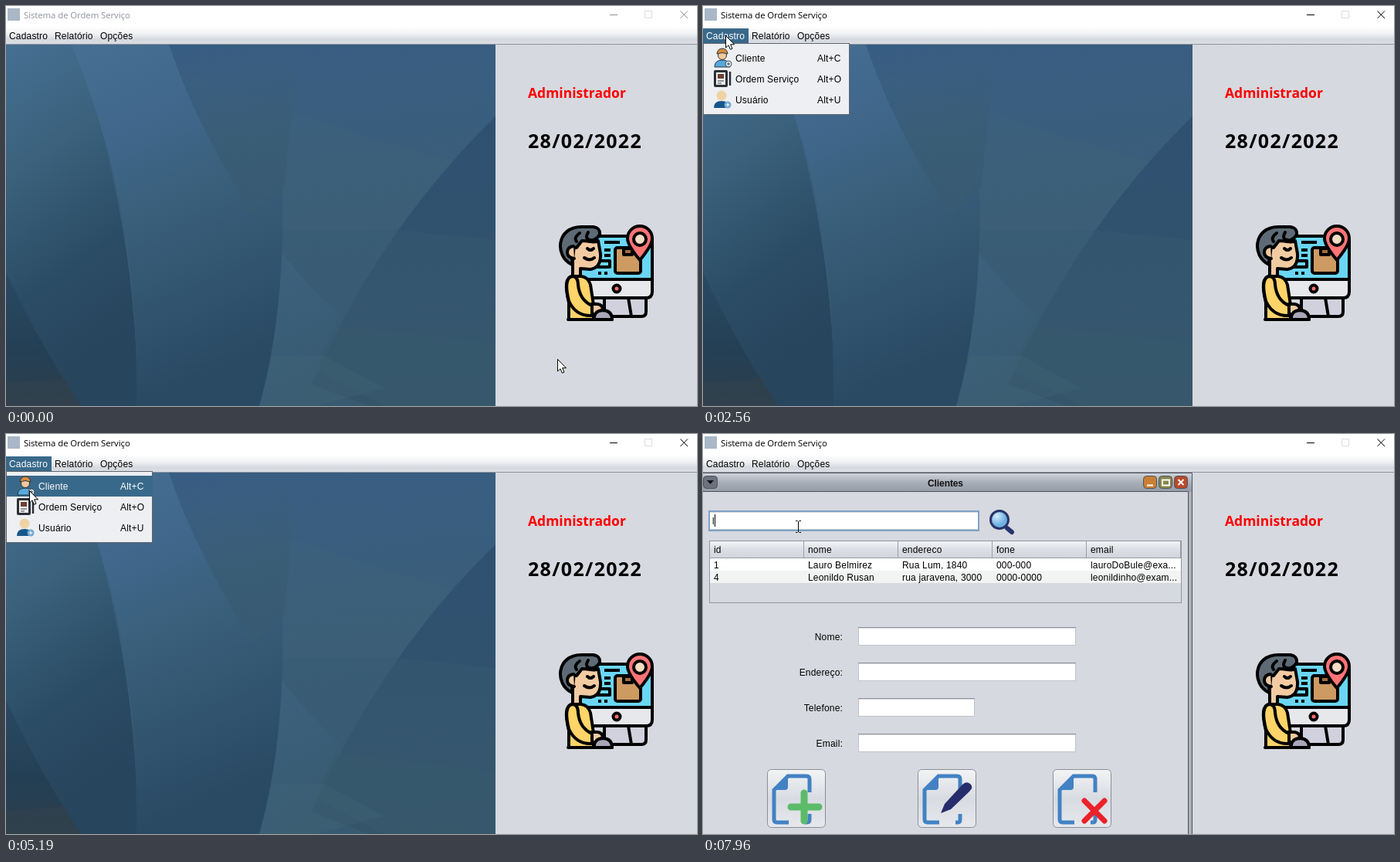
Animation of 895 by 518 pixels, one loop 8000 ms. Source, as an HTML page:

```html
<!DOCTYPE html>
<html lang="pt">
<head>
<meta charset="utf-8">
<style>
html, body { margin: 0; width: 100%; height: 100%; overflow: hidden; }
svg { display: block; width: 895px; height: 518px; }
text { font: 12px "Liberation Sans", Arial, sans-serif; letter-spacing: .18px; white-space: pre; }
.title { font: 11.4px "Open Sans", sans-serif; letter-spacing: -.08px; }
.big { font: bold 17.5px "Noto Sans", sans-serif; letter-spacing: 0; }
.date { font: bold 25px "Noto Sans", sans-serif; letter-spacing: 1.3px; }
.bold { font-weight: bold; letter-spacing: -.1px; }
.end { text-anchor: end; }
</style>
</head>
<body>
<svg viewBox="0 0 895 518">
<defs>
  <linearGradient id="bar" x2="0" y2="1"><stop stop-color="#fff"/><stop offset=".4" stop-color="#f1f2f4"/><stop offset=".75" stop-color="#d5d9df"/><stop offset="1" stop-color="#dcdfe4"/></linearGradient>
  <linearGradient id="head" x2="0" y2="1"><stop stop-color="#f4f5f7"/><stop offset=".5" stop-color="#dcdfe5"/><stop offset="1" stop-color="#d0d4da"/></linearGradient>
  <linearGradient id="btn" x2="0" y2="1"><stop stop-color="#f3f4f6"/><stop offset=".5" stop-color="#d8dbe1"/><stop offset="1" stop-color="#e6e8ec"/></linearGradient>
  <linearGradient id="liveBar" x2="0" y2="1"><stop stop-color="#d2d6dc"/><stop offset=".5" stop-color="#a9afb9"/><stop offset="1" stop-color="#949ba7"/></linearGradient>
  <linearGradient id="idleBar" x2="0" y2="1"><stop stop-color="#aeb4be"/><stop offset="1" stop-color="#c6cad1"/></linearGradient>
  <linearGradient id="sky" x2=".15" y2="1"><stop stop-color="#385d83"/><stop offset=".25" stop-color="#395e7f"/><stop offset=".6" stop-color="#3a5d76"/><stop offset="1" stop-color="#385a71"/></linearGradient>
  <linearGradient id="left" x2=".25" y2="1"><stop stop-color="#466f92"/><stop offset=".35" stop-color="#3b617c"/><stop offset=".7" stop-color="#2b4c65"/><stop offset="1" stop-color="#27455c"/></linearGradient>
  <linearGradient id="ribbon" x2=".25" y2="1"><stop stop-color="#476f93"/><stop offset=".3" stop-color="#40678a"/><stop offset=".55" stop-color="#395e79"/><stop offset="1" stop-color="#2a4a64"/></linearGradient>
  <linearGradient id="right" x2="0" y2="1"><stop stop-color="#2f5070"/><stop offset=".6" stop-color="#32536d"/><stop offset="1" stop-color="#355569"/></linearGradient>
  <linearGradient id="corner" x2="0" y2="1"><stop stop-color="#2a4a62"/><stop offset=".6" stop-color="#243f54"/><stop offset="1" stop-color="#2d3f4d"/></linearGradient>
  <linearGradient id="fade" x2=".4" y2="1"><stop stop-color="#3d6380"/><stop offset="1" stop-color="#3d6380" stop-opacity="0"/></linearGradient>
  <radialGradient id="lens" cx=".35" cy=".3"><stop stop-color="#d5ecfb"/><stop offset="1" stop-color="#6fb2e2"/></radialGradient>
</defs>

<!-- window chrome -->
<path fill="#fff" d="M0 0H895V27H0z"/>
<path fill="#a9b7c7" d="M2 3h16v16H2z"/>
<text id="caption" class="title" x="23" y="16">Sistema de Ordem Serviço</text>
<g id="winBtns" fill="none"><path d="M782 11.5h10M873.5 6.5l9.500 9.500m0-9.500l-9.500 9.500"/><path stroke="#ddd" d="M827.500 6.500h9v9h-9z"/></g>
<path fill="url(#bar)" d="M0 27H895V49H0z"/>
<path fill="#9094a0" d="M0 49H895v1H0z"/>
<g id="menuBar"></g>

<!-- desktop -->
<path fill="url(#sky)" d="M0 50H634V518H0z"/>
<path fill="#41657a" opacity=".25" d="M225 85L470 170 634 215V290L360 290Q290 220 225 85z"/>
<path fill="url(#left)" d="M0 50H90Q172 290 170 518H0z"/>
<path fill="url(#corner)" d="M0 345Q45 440 97 518H0z"/>
<path fill="#33414d" opacity=".6" d="M0 488L75 482 97 518H0z"/>
<path fill="url(#fade)" d="M320 270Q380 355 432 400L400 470 490 490 400 518H328Q358 420 359 235z"/>
<path fill="url(#ribbon)" d="M85 50H211C242 140 285 215 320 270L358 222C362 360 346 455 328 518H169C172 330 142 190 85 50z"/>
<path fill="url(#sky)" d="M211 50H380L360 235 320 270C285 215 242 140 211 50z" opacity=".8"/>
<path fill="url(#right)" d="M634 143C535 240 462 345 395 490L470 518H634z"/>
<path fill="#3a5d70" opacity=".3" d="M505 290L634 303V437L428 415z"/>
<path fill="#3a5b6e" opacity=".55" d="M428 414L634 437V518H490L400 470z"/>
<path fill="#416477" opacity=".35" d="M345 453H412L490 495 400 518H328z"/>

<!-- side panel -->
<path fill="#d6d9df" d="M634 50H895V518H634z"/>
<text class="big" x="676" y="119" fill="#f00">Administrador</text>
<text class="date" x="676" y="184">28/02/2022</text>
<g stroke="#000" stroke-width="4" stroke-linejoin="round" stroke-linecap="round">
  <path fill="#d0d1dd" d="M775 378H829V396Q829 402 823 402H775zM806 378L810 402"/>
  <path fill="#6ad6f3" d="M742 298H830Q837 298 837 305V354H742z"/>
  <path fill="#e7e8ec" d="M742 354H837V370Q837 378 829 378H742z"/>
  <circle cx="791" cy="366" r="4.500" fill="#ff7070"/>
  <path fill="none" stroke-linecap="butt" d="M775 306H795M775 316H783M775 323H783M762 330H782V338H764M767 346h4M775 346h4"/>
  <rect x="789" y="313" width="33" height="33" rx="3" fill="#cd9a62"/>
  <path fill="#a06c3c" d="M800 314h11v8h-11z"/>
  <path fill="#ff7476" d="M821 329Q805 310 805 301A16 16 0 0 1 837 301Q837 310 821 329z"/>
  <circle cx="821" cy="302" r="8" fill="#f6dcc3"/>
  <path fill="#f2cba2" d="M737 299Q760 309 767 304L770 321Q771 339 757 341L744 340V354H734V329z"/>
  <path fill="#5e6b76" d="M733 335C710 324 713 286 745 286H760Q770 287 769 296Q764 306 746 304L739 313 734 312z"/>
  <path fill="none" d="M754 293Q749 302 757 303M743 294Q735 300 739 305M753 314q4 4 8 0M749 326q7 5 13 0"/>
  <path fill="#f2cba2" d="M735 311Q727 312 727 319Q727 326 736 327"/>
  <path fill="#ffd469" d="M729 406V384Q721 352 733 350H745Q754 351 757 361L761 387V406z"/>
  <path fill="none" d="M739 352Q736 382 754 388"/>
  <path fill="#f2cba2" d="M758 386H766Q773 387 773 393L764 399H755z"/>
  <path fill="#ffd469" d="M729 382Q722 353 733 350Q741 350 741 361Q743 381 759 388V401Q738 402 729 382z"/>
  <path fill="#aaa6ba" d="M762 406V402Q764 394 774 394Q785 395 785 406z"/>
  <path d="M728 406H785"/>
</g>

<g id="win">
  <path fill="#d6d9df" d="M0 50H634V518H0z"/>
  <g id="idle"></g><g id="live"></g>
  <g id="form"></g>
  <path id="focus" fill="none" stroke="#7fa2c6" stroke-width="2" d="M8 100H357V125H8z"/>
  <text id="typed" x="12" y="117">l</text>
  <path id="caret" stroke="#000" d="M.5 104V120"/>
  <g stroke="#27346b"><path stroke-width="6" stroke-linecap="round" d="M394 122L400 127"/><circle cx="384" cy="111" r="11.500" stroke-width="3" fill="url(#lens)"/></g>
  <g id="empty"></g><g id="filled"></g>
</g>
<g id="popups"></g>
<path id="arrow" fill="#fff" stroke="#000" d="M.5.5V16L4 12.800 6.400 18.300 9 17.200 6.600 11.800H11.500z"/>
<path id="beam" fill="none" stroke="#000" d="M-3-7.500H-.5M1.500-7.500H4M-3 7.500H-.5M1.500 7.500H4M.5-7V7"/>
</svg>

<script>
const $ = id => document.getElementById(id);
const show = (id, on) => $(id).style.display = on ? '' : 'none';
const text = (x, y, s, attrs = '') => `<text x="${x}" y="${y}" ${attrs}>${s}</text>`;
const rect = (x, y, w, h, fill, attrs = '') =>
  `<rect x="${x}" y="${y}" width="${w}" height="${h}" fill="${fill}" ${attrs}/>`;
const path = (d, attrs) => `<path d="${d}" ${attrs}/>`;

// 24 px menu icons
const badge = '<circle cx="20" cy="20" r="4" fill="#dfe8ee" stroke="#41515d"/><path d="M18 20h4M20 18v4" stroke="#41515d"/>';
const board = (ink, paper) => rect(3, 2, 18, 21, ink, 'rx="2"') + rect(6, 5, 12, 15, paper) + rect(9, 0, 6, 5, ink, 'rx="1"');
const icons = {
  client: path('M2 24Q2 15 12 15T22 24z', 'fill="#57a9dc" stroke="#263843"') +
    '<circle cx="12" cy="9" r="5.500" fill="#f3c89b" stroke="#263843"/>' +
    path('M5 7Q6 0 12 0T19 7Q12 4 5 7z', 'fill="#d98a3d" stroke="#263843"') + badge,
  order: rect(1, 1, 18, 22, '#2b2f36', 'rx="2"') + rect(4, 4, 12, 16, '#f1efec') + rect(6, 6, 8, 6, '#6d4133') +
    path('M6 15h8M6 18h5', 'stroke="#33404c"') + path('M22 3V21', 'stroke="#2b2f36" stroke-width="2.500"'),
  user: path('M1 23Q1 14 11 14T21 23z', 'fill="#17568c"') + '<circle cx="11" cy="7" r="6.500" fill="#f0d3a4"/>' +
    '<circle cx="19" cy="19" r="4.500" fill="#6ea7d1"/><path d="M16.500 19h5M19 16.500v5" stroke="#fff"/>',
  sheet: path('M4 1H20V20H4z', 'fill="#dfe6f3"') + path('M1 21H16V23H1z', 'fill="#c9d0e6"') + path('M21.500 1V18', 'stroke="#9aa4c4" stroke-width="2"') +
    '<circle cx="11" cy="8" r="3" fill="#3b8fd6"/>' + path('M7 16Q7 11 11 11T15 16z', 'fill="#3b8fd6"'),
  list: board('#30343a', '#eceef0') + path('M7 8h3M12 8h5M7 12h3M12 12h5M7 16h3M12 16h5', 'stroke="#30343a" stroke-width="2"')
};

const menus = [
  { name: 'Cadastro', x: 0, tx: 4, w: 59, pw: 190, keyX: 148, items: [['Cliente', 'Alt+C', 'client'], ['Ordem Serviço', 'Alt+O', 'order'], ['Usuário', 'Alt+U', 'user']] },
  { name: 'Relatório', x: 59, tx: 63, w: 59, pw: 168, keyX: 174, items: [['Clientes', 'Shift+C', 'sheet'], ['Serviços', 'Shift+S', 'list']] },
  { name: 'Opções', x: 118, tx: 122, w: 51, pw: 117, keyX: 184, items: [['Sair', 'Alt+F4']] }
];
$('menuBar').innerHTML = menus.map((m, i) =>
  rect(m.x, 29, m.w, 19, '#39698a', `id="hot${i}"`) + text(m.tx, 43, m.name, `id="name${i}"`)).join('');
$('popups').innerHTML = menus.map((m, i) => `<g id="pop${i}">` +
  rect(m.x + .5, 48.5, m.pw - 1, 11 + 27 * m.items.length, '#edeff2', 'stroke="#60656e"') +
  (i ? '' : rect(1, 54, 189, 27, '#39698a', 'id="hover"')) +
  m.items.map(([label, key, icon], j) => {
    const y = 54 + 27 * j, id = `class="item${i}${j}"`;
    return (icon ? `<g transform="translate(${m.x + 13} ${y + 1})">${icons[icon]}</g>` : '') +
      text(m.x + (icon ? 42 : 14), y + 18, label, id) + text(m.keyX, y + 18, key, id);
  }).join('') + '</g>').join('');

// internal window title bar and border
function chrome(bar, edge, ink, tints) {
  const signs = ['M575 66.500h8', 'M595 59.500h9v7h-9z', 'M615.500 59l7 7m0-7l-7 7'];
  return rect(0, 50, 634, 25, `url(#${bar})`) + path('M0 50.500H633.500V518M0 74.500H628.500V518', `fill="none" stroke="${edge}"`) +
    rect(629, 75, 4, 443, edge, 'opacity=".3"') +
    rect(.5, 54.500, 18, 16, tints[0], `rx="4" stroke="${edge}"`) + path('M5 60h9l-4.500 5z', `fill="${ink}"`) +
    signs.map((d, i) => rect(570.500 + 20 * i, 54.500, 17, 16, tints[i + 1], `rx="4" stroke="${edge}"`) +
      path(d, `fill="none" stroke="${bar == 'liveBar' ? '#fff' : '#5b6068'}" stroke-width="2"`)).join('') +
    text(314, 68, 'Clientes', `class="bold" text-anchor="middle" fill="${ink}"`);
}
$('idle').innerHTML = chrome('idleBar', '#8b909a', '#85898f', ['#c3c7ce', '#c3c7ce', '#c3c7ce', '#c3c7ce']);
$('live').innerHTML = chrome('liveBar', '#4e545e', '#111', ['#6b727e', '#c97f35', '#87864a', '#b84a2c']);

const field = (x, y, w) => rect(x + .5, y + .5, w - 1, 23, '#fff', 'stroke="#c0c4ca"') +
  path(`M${x} ${y + .5}h${w}`, 'stroke="#8f9298"') + path(`M${x + 1} ${y + 1.500}h${w - 2}`, 'stroke="#d8dade"');
const tools = [
  path('M131 465v36M114 483h36', 'stroke="#5cbb69" stroke-width="9" stroke-linecap="round"'),
  path('M308 491L313 479 336 454Q341 449 346 453T345 463L321 486z', 'fill="#272d6b"'),
  path('M494 475l26 26m0-26l-26 26', 'stroke="#ea2229" stroke-width="7" stroke-linecap="round"')
];
$('form').innerHTML = field(8, 100, 349) +
  ['Nome:', 'Endereço:', 'Telefone:', 'Email:'].map((s, i) =>
    text(181, 267 + 46 * i, s, 'class="end"') + field(201, 250 + 46 * i, i == 2 ? 151 : 282)).join('') +
  [83, 278, 453].map((x, i) => rect(x + .5, 434.500, 75, 75, 'url(#btn)', 'rx="5" stroke="#8a8e96"') +
    `<g transform="translate(${x} 434)">` +
    path('M55 30V13Q55 9 51 9H27L9 27V65Q9 69 13 69H28M49 69H52Q55 69 55 65V58', 'fill="none" stroke="#4282c4" stroke-width="5"') +
    path('M7 27L27 7V23Q27 27 23 27z', 'fill="#4282c4"') + '</g>' + tools[i]).join('');

function table(step, width) {
  const names = ['id', 'nome', 'endereco', 'fone', 'email'];
  return rect(8, 138, 612, 23, 'url(#head)') +
    names.map((s, i) => text(14 + step * i, 154, s) +
      path(`M${8.500 + step * (i + 1)} 139V160`, 'stroke="#9a9ea7"')).join('') +
    path('M8 160.500H620', 'stroke="#9a9ea7"');
}
const outline = rect(8.500, 138.500, 611, 80, 'none', 'stroke="#9095a0"');
$('empty').innerHTML = rect(9, 161, 595, 57, '#fff') + rect(9, 177, 595, 16, '#f2f3f3') + rect(9, 209, 595, 9, '#f2f3f3') +
  table(119) + rect(604, 161, 15, 57, '#e3e5e9') +
  path('M603.500 161V218M604 177.500h15M604 201.500h15', 'stroke="#a3a7af"') +
  path('M604 178h8q7 3 7 11t-7 12h-8z', 'fill="#c5c8d0" stroke="#777b87"') + path('M604 179q9 10 0 20z', 'fill="#44465a"') +
  path('M608 173h8l-4-7zM608 206h8l-4 7z', 'fill="#333"') + outline;
const rows = [
  ['1', 'Lauro Belmirez', 'Rua Lum, 1840', '000-000', 'lauroDoBule@exa...'],
  ['4', 'Leonildo Rusan', 'rua jaravena, 3000', '0000-0000', 'leonildinho@exam...']
];
$('filled').innerHTML = rect(9, 161, 610, 57, '#d6d9df') + rect(9, 161, 610, 16, '#fff') + rect(9, 177, 610, 16, '#f2f3f3') +
  table(122) + rows.map((r, j) => r.map((s, i) => text(14 + 122 * i, 174 + 16 * j, s)).join('')).join('') + outline;

// pointer moves: start, last step, steps, x, y
const moves = [
  [70, 850, 12, 50, 42], [920, 920, 1, 38, 42], [1120, 1120, 1, 37, 42], [1450, 1840, 6, 30, 39],
  [2560, 2560, 1, 29, 38], [2690, 3350, 10, 120, 37], [3420, 3560, 3, 136, 37], [3890, 4370, 7, 60, 37],
  [4440, 4650, 4, 32, 40], [4910, 5190, 5, 30, 73], [6000, 6620, 10, 125, 124], [6690, 6760, 2, 123, 124],
  [7030, 7030, 1, 123, 120]
];
function pointer(t) {
  let x = 714, y = 457;
  for (const [from, to, n, tx, ty] of moves) {
    if (t < from) break;
    const k = n == 1 ? 1 : Math.min(n, Math.floor((t - from) * (n - 1) / (to - from) + .01) + 1);
    let f = k / n;
    if (n > 9) f *= f * (3 - 2 * f);
    x += (tx - x) * f;
    y += (ty - y) * f;
  }
  return [Math.round(x), Math.round(y)];
}

function draw() {
  const t = performance.now() % 8000, [x, y] = pointer(t);
  const awake = t >= 1450, opened = t >= 5520, focused = t >= 6830, typed = t >= 7890, found = t >= 7960;
  $('caption').setAttribute('fill', awake ? '#000' : '#8e959e');
  $('winBtns').setAttribute('stroke', awake ? '#000' : '#8f8f8f');

  const open = t < 1520 || opened ? -1 : x < 59 ? 0 : x < 118 ? 1 : 2;
  menus.forEach((m, i) => {
    show('hot' + i, i == open);
    show('pop' + i, i == open);
    $('name' + i).setAttribute('fill', i == open ? '#fff' : '#000');
  });
  const hover = open == 0 && y >= 54;
  show('hover', hover);
  document.querySelectorAll('.item00').forEach(e => e.setAttribute('fill', hover ? '#fff' : '#000'));

  show('win', opened);
  show('idle', !focused);
  show('live', focused);
  show('focus', focused);
  show('typed', typed);
  show('caret', focused && (t < 7300 || t >= 7760));
  $('caret').setAttribute('transform', `translate(${typed ? 15 : 12})`);
  show('empty', !found);
  show('filled', found);

  const beam = opened && y >= 100;
  show('arrow', !beam);
  show('beam', beam);
  $(beam ? 'beam' : 'arrow').setAttribute('transform', `translate(${x} ${y})`);
  requestAnimationFrame(draw);
}
draw();
</script>
</body>
</html>
```
